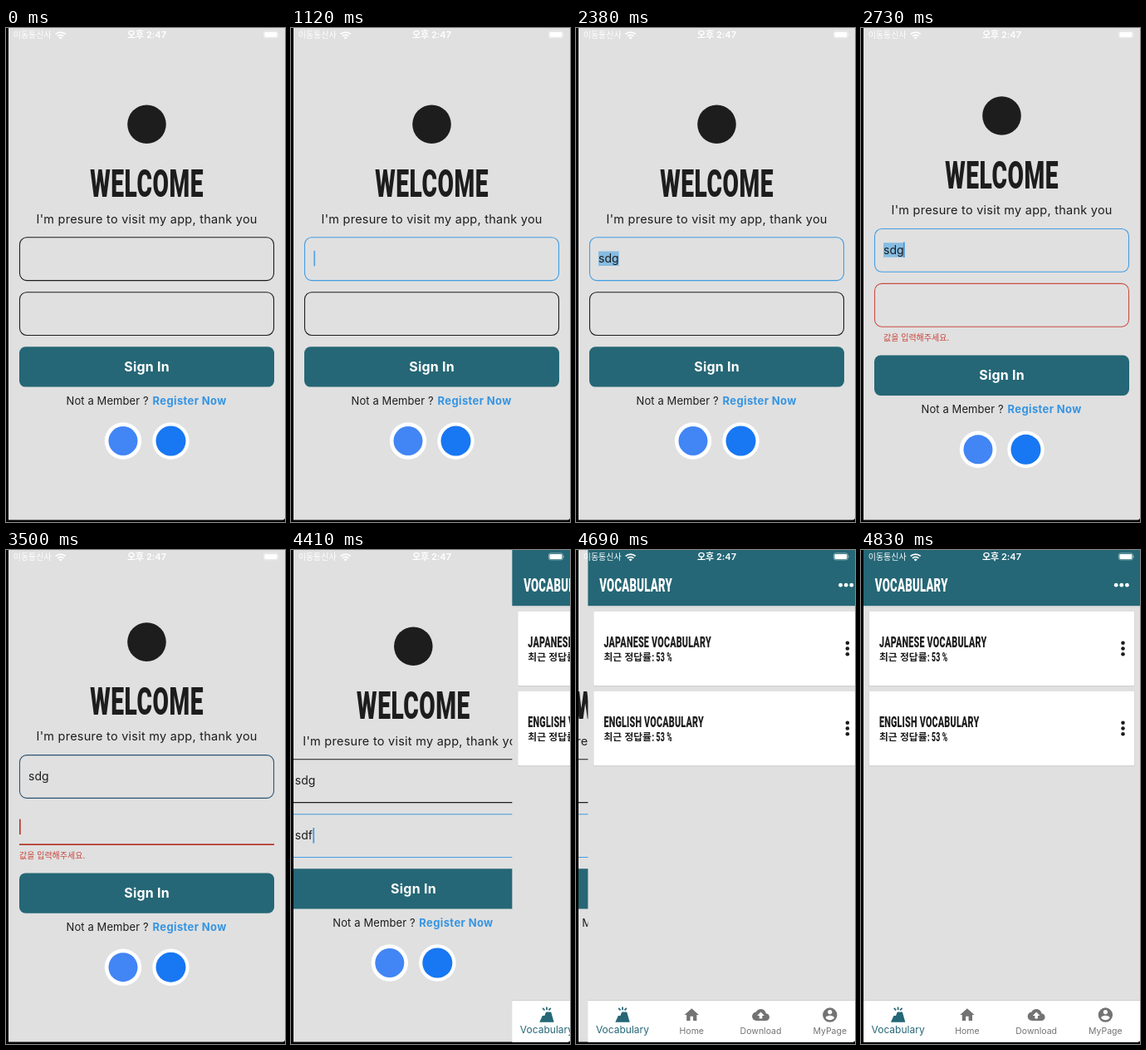
An HTML page that plays this animation: 336x594 px, repeating every 6.37 s.

```html
<!DOCTYPE html>
<html lang="ko">
<head>
<meta charset="utf-8">
<title>Sign in</title>
<style>
  html, body { margin: 0; width: 100%; height: 100%; overflow: hidden; background: #000; }
  svg { display: block; width: 100vw; height: 100vh; font-family: Inter, "Noto Sans CJK KR", sans-serif; }
  text { white-space: pre; }
  .ko { font-family: "Noto Sans CJK KR", sans-serif; }
  .head { font-family: Roboto, sans-serif; font-weight: 800; letter-spacing: .018em; }
  .mid { text-anchor: middle; }
  .airy { letter-spacing: .25px; }
</style>
</head>
<body>
<svg viewBox="0 0 336 594">
  <defs>
    <clipPath id="screen"><path d="M3 0H336V588.5Q336 591.5 333 591.5H3z"/></clipPath>
  </defs>
  <rect width="336" height="594"/>
  <g clip-path="url(#screen)">
    <rect x="3" width="333" height="592" fill="#e0e0e0"/>

    <g id="login" fill="#1d1d1d">
      <g id="upper">
        <circle cx="169.5" cy="115.8" r="23.3"/>
        <text class="head" font-size="47" transform="translate(101.3 202.8) scale(.6 1)">WELCOME</text>
        <text class="mid airy" x="169.6" y="234.5" font-size="14.5">I'm presure to visit my app, thank you</text>
        <rect id="box1" x="16.5" y="251.8" width="306" height="51.8" rx="8.5" fill="none" stroke-width="1.1"/>
        <rect id="select" x="27" y="268.5" width="24.7" height="17.5" fill="#86bce2"/>
        <text id="text1" x="27" y="282" font-size="14"></text>
        <rect id="caret1" y="267.8" width="1.7" height="18.5" fill="#3f97e0"/>
      </g>
      <g id="field2">
        <rect id="box2" x="16.5" y="317.7" width="306" height="51.8" rx="8.5" fill="none" stroke-width="1.1"/>
        <path id="line2" d="M16 364.6H323" stroke="#b5392f" stroke-width="1.8"/>
        <text id="text2" y="348" font-size="14"></text>
        <rect id="caret2" y="334" width="1.7" height="18.5"/>
        <text id="error" class="ko" font-size="10" fill="#c9463c">값을 입력해주세요.</text>
      </g>
      <g id="lower">
        <rect x="16" y="383.2" width="307" height="48.4" rx="7.5" fill="#256776"/>
        <text class="mid airy" x="169.6" y="413.2" font-size="16" font-weight="700" fill="#fff">Sign In</text>
        <text x="72.5" y="453" font-size="13" letter-spacing=".1">Not a Member ?</text>
        <text x="176.5" y="453" font-size="13" font-weight="700" letter-spacing=".38" fill="#3594e2">Register Now</text>
        <circle cx="141" cy="496.5" r="22.2" fill="#fff"/>
        <circle cx="141" cy="496.5" r="17.5" fill="#4285f4"/>
        <circle cx="198.5" cy="496.5" r="22.2" fill="#fff"/>
        <circle cx="198.5" cy="496.5" r="18" fill="#1877f2"/>
      </g>
    </g>

    <g id="home">
      <rect x="3" width="333" height="592" fill="#e0e0e0"/>
      <rect x="3" y="67" width="333" height="1.2" fill="#c4cbcd"/>
      <rect x="3" width="333" height="67" fill="#256776"/>
      <text class="head" font-size="22" fill="#fff" transform="translate(16.8 50) scale(.6 1)">VOCABULARY</text>
      <g id="more" fill="#fff"></g>
      <g id="cards"></g>
      <rect x="3" y="541" width="333" height="1" fill="#cfcfcf"/>
      <rect x="3" y="542" width="333" height="50" fill="#fff"/>
      <g id="nav"></g>
    </g>

    <g fill="#fff">
      <text class="ko" x="8.7" y="12" font-size="10">이동통신사</text>
      <path d="M59.7 7.4A9 9 0 0 1 71.7 7.4M62 9.9A5.6 5.6 0 0 1 69.4 9.9" fill="none" stroke="#fff" stroke-width="1.9"/>
      <path d="M65.7 13.4L63.7 11.5A2.9 2.9 0 0 1 67.7 11.5z"/>
      <text class="mid" x="169.5" y="12.3" font-size="11" font-weight="600">오후 2:47</text>
      <rect x="310.4" y="3.9" width="17" height="8" rx="2.4" fill="none" stroke="#fff" stroke-opacity=".55" stroke-width=".8"/>
      <rect x="311.4" y="4.9" width="15" height="6" rx="1.4"/>
      <path d="M328.4 6.5q1.4 1.4 0 2.8z" fill-opacity=".6"/>
    </g>
  </g>
</svg>
<script>
const LOOP = 6370, STEP = 70;
const INK = [29, 29, 29], BLUE = [66, 157, 226], RED = [200, 78, 68];
const $ = id => document.getElementById(id);
const set = (id, attrs) => {
  for (const k in attrs) $(id).setAttribute(k, attrs[k]);
};
const show = (id, on) => set(id, { opacity: +on });
const ramp = (t, a, b) => Math.min(1, Math.max(0, (t - a) / (b - a)));
const mix = (a, b, p) => `rgb(${a.map((v, i) => Math.round(v + (b[i] - v) * p))})`;

function dots(x, y, dx, dy, r) {
  return [-1, 0, 1].map(i => `<circle cx="${x + i * dx}" cy="${y + i * dy}" r="${r}"/>`).join('');
}

function card(y, title) {
  return `<g fill="#1d1d1d">
    <rect x="9.5" y="${y + 0.3}" width="320" height="90" rx="1.5" fill="#d2d2d2"/>
    <rect x="10" y="${y}" width="319" height="89" rx="1" fill="#fff"/>
    <text class="head" font-size="18" transform="translate(22 ${y + 42.7}) scale(.6 1)">${title}</text>
    <text class="ko" x="22" y="${y + 59.3}" font-size="11.8" font-weight="700">최근 정답률</text>
    <text class="head" font-size="14.5" transform="translate(80 ${y + 59.8}) scale(.6 1)">: 53 %</text>
    ${dots(315.5, y + 44.5, 0, 6.8, 2.3)}</g>`;
}

const TABS = [
  ['Vocabulary', 'M18 8h-7l-2 5H6l-4 9h20zM11 1h2v4h-2zM5.7 3.3l1.4-1.4 2.8 2.8-1.4 1.4zM18.3 3.3l-1.4-1.4-2.8 2.8 1.4 1.4z'],
  ['Home', 'M10 20v-6h4v6h5v-8h3L12 3 2 12h3v8z'],
  ['Download', 'M19.35 10.04C18.67 6.59 15.64 4 12 4 9.11 4 6.6 5.64 5.35 8.04 2.34 8.36 0 10.91 0 14c0 3.31 2.69 6 6 6h13c2.76 0 5-2.24 5-5 0-2.64-2.05-4.78-4.65-4.96zM14 13v4h-4v-4H7l5-5 5 5z'],
  ['MyPage', 'M12 2a10 10 0 1 0 0 20a10 10 0 1 0 0-20zm0 3a3 3 0 1 1 0 6a3 3 0 1 1 0-6zm0 14.2c-2.5 0-4.71-1.28-6-3.22.03-1.99 4-3.08 6-3.08s5.97 1.09 6 3.08c-1.29 1.94-3.5 3.22-6 3.22z']
];

function tab([name, icon], i) {
  const x = 44.6 + i * 83.25, on = i === 0;
  return `<g fill="${on ? '#256776' : '#737373'}">
    <path fill-rule="evenodd" transform="translate(${x - 10.4} 548.6) scale(.87)" d="${icon}"/>
    <text class="mid" x="${x}" y="${on ? 581 : 581.7}" font-size="${on ? 12 : 10.5}">${name}</text></g>`;
}

$('more').innerHTML = dots(313.8, 42.2, 6.6, 0, 2.4);
$('cards').innerHTML = card(74, 'JAPANESE VOCABULARY') + card(170, 'ENGLISH VOCABULARY');
$('nav').innerHTML = TABS.map(tab).join('');

// Cubic bezier (.35,.91) (.33,.97), solved by bisection
function easeOut(x) {
  const at = (s, a, b) => 3 * a * s * (1 - s) ** 2 + 3 * b * s * s * (1 - s) + s ** 3;
  let lo = 0, hi = 1;
  for (let i = 0; i < 24; i++) {
    const m = (lo + hi) / 2;
    if (at(m, 0.35, 0.33) < x) lo = m; else hi = m;
  }
  return at(hi, 0.91, 0.97);
}

function caret1Alpha(t) {
  if (t < 1540) return ramp(t, 490, 700) * (1 - ramp(t, 1090, 1260));
  if (t < 2450) return 1 - ramp(t, 2170, 2380);
  return ramp(t, 2520, 2730) * (1 - ramp(t, 3220, 3430));
}

function draw(t) {
  const failed = t >= 2450 && t < 3430;
  const retry = t >= 3430 && t < 4410;
  const valid = t >= 4410;
  const shift = failed ? 10.3 : retry ? 5.2 : 0;

  set('upper', { transform: `translate(0 ${-shift})` });
  set('lower', { transform: `translate(0 ${shift})` });
  set('field2', { transform: `translate(0 ${retry ? -2 * shift : -shift})` });

  // First field
  const focus = ramp(t, 490, 770) * (1 - ramp(t, 3407, 3570));
  const typed = Math.min(3, Math.max(0, Math.floor((t - 1540) / STEP) + 1));
  set('box1', { stroke: mix(INK, BLUE, focus) });
  $('text1').textContent = 'sdg'.slice(0, typed);
  set('caret1', { x: [27.4, 34.6, 43.2, 51][typed], opacity: caret1Alpha(t) });
  show('select', t >= 1890 && t < 3430);

  // Second field
  const word = t < 3850 ? '' : t < 3920 ? 'sd' : 'sdf';
  const left = retry ? 16 : 27;
  set('box2', {
    stroke: valid ? mix(INK, BLUE, 1) : mix(INK, RED, ramp(t, 2410, 2660)),
    opacity: +!retry
  });
  show('line2', retry);
  $('text2').textContent = word;
  set('text2', { x: left });
  set('caret2', {
    x: left + [0, 0, 16.3, 21.6][word.length],
    fill: valid ? '#3f97e0' : '#b5392f',
    opacity: +(t >= 3430)
  });
  set('error', {
    x: left,
    y: retry ? 381.6 : 386.3,
    opacity: retry ? 1 : failed ? ramp(t, 2400, 2660) : 0
  });

  // Page push
  const slide = t < 4410 ? 0 : t >= 4830 ? 1 : easeOut(ramp(t, 4370, 4870));
  set('login', { transform: `translate(${-106 * slide} 0)` });
  set('home', { transform: `translate(${333 * (1 - slide)} 0)` });
}

const start = performance.now();
function tick() {
  const t = (performance.now() - start) % LOOP;
  draw(Math.floor(t / STEP) * STEP);
  requestAnimationFrame(tick);
}
draw(0);
requestAnimationFrame(tick);
</script>
</body>
</html>
```
